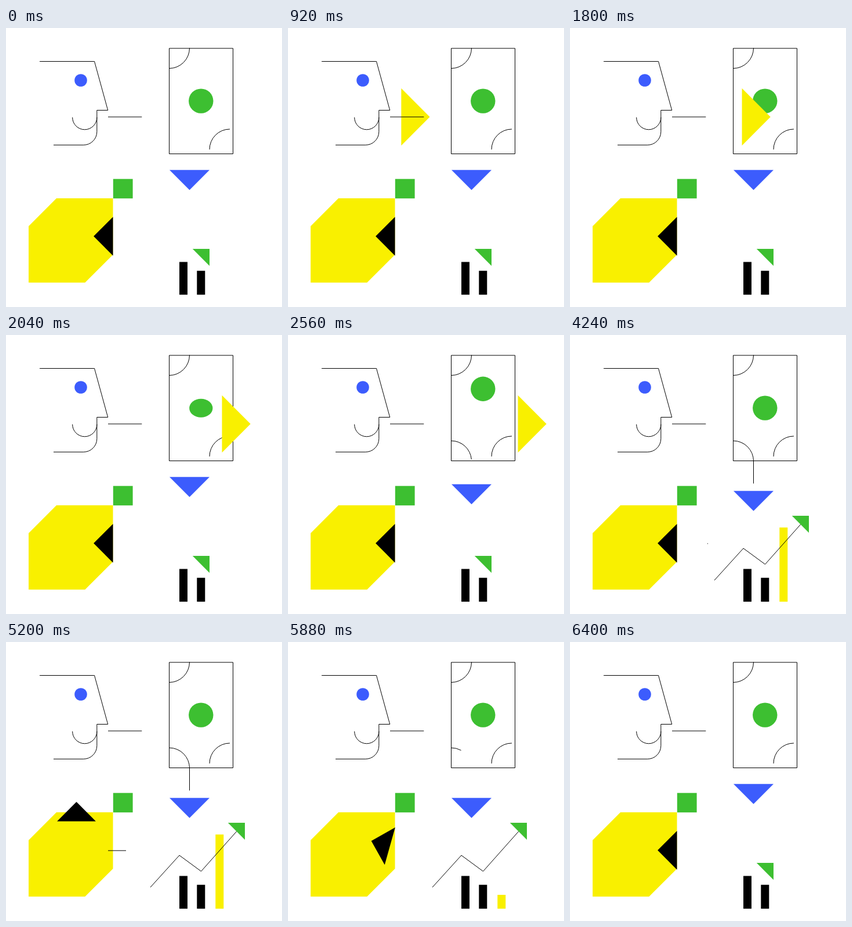
Write an HTML page with a canvas that moves like this. It is 476 px wide and 480 px high and loops after 6720 ms.

```html
<!DOCTYPE html>
<html lang="en">
<head>
<meta charset="utf-8">
<title>Shapes at work</title>
<style>
  html, body { margin: 0; width: 100%; height: 100%; overflow: hidden; background: #fff; }
  canvas { display: block; }
</style>
</head>
<body>
<canvas id="stage" width="476" height="480"></canvas>
<script>
const ctx = document.getElementById('stage').getContext('2d');
const LOOP = 6720, STEP = 40;
const YELLOW = '#f9f000', GREEN = '#3dbf31', BLUE = '#3c5cfd', BLACK = '#000';

const clamp = u => Math.min(1, Math.max(0, u));
const span = (t, from, to) => clamp((t - from) / (to - from));
const mix = (a, b, u) => a + (b - a) * u;
const outCubic = u => 1 - (1 - u) ** 3;
const inOut = u => u < 0.5 ? 4 * u ** 3 : 1 - 4 * (1 - u) ** 3;
const inOutQuad = u => u < 0.5 ? 2 * u * u : 1 - 2 * (1 - u) ** 2;
const outExpo = u => u >= 1 ? 1 : 1 - 2 ** (-10 * u);
const outBack = (u, c) => 1 + (c + 1) * (u - 1) ** 3 + c * (u - 1) ** 2;

function polygon(color, ...points) {
  ctx.fillStyle = color;
  ctx.beginPath();
  points.forEach(([x, y]) => ctx.lineTo(x, y));
  ctx.closePath();
  ctx.fill();
}

function rect(color, x, y, w, h) {
  ctx.fillStyle = color;
  ctx.fillRect(x, y, w, h);
}

function ellipse(color, x, y, rx, ry) {
  ctx.fillStyle = color;
  ctx.beginPath();
  ctx.ellipse(x, y, rx, Math.max(0, ry), 0, 0, 2 * Math.PI);
  ctx.fill();
}

// Strokes the path built by trace; a given length limits how much is drawn.
function stroke(trace, length = Infinity) {
  if (length <= 0) return;
  ctx.save();
  ctx.strokeStyle = BLACK;
  ctx.lineWidth = 1;
  if (length < Infinity) ctx.setLineDash([length, 9999]);
  ctx.beginPath();
  trace();
  ctx.stroke();
  ctx.restore();
}

function line(...points) {
  return () => points.forEach(([x, y]) => ctx.lineTo(x, y));
}

function placed(x, y, scale, angle, draw) {
  if (scale <= 0) return;
  ctx.save();
  ctx.translate(x, y);
  ctx.rotate(angle);
  ctx.scale(scale, scale);
  draw();
  ctx.restore();
}

// Coin: three falling hops with a squash at every contact.
const CONTACTS = [2030, 2400, 2740, 3038], HOPS = [47, 33, 20];

function drawCoin(t) {
  let lift = 0, squash = 0;
  CONTACTS.forEach((start, i) => {
    squash += 0.26 * Math.exp(-(((t - start) / 40) ** 2));
    if (i < HOPS.length) {
      const u = span(t, start, CONTACTS[i + 1]);
      lift += HOPS[i] * 4 * u * (1 - u);
    }
  });
  ellipse(GREEN, 336.3, 125.6 + 21 * squash - lift, 21.2 * (1 - 0.2 * squash), 21.2 * (1 - squash));
}

function drawBill(t) {
  stroke(() => ctx.rect(281.5, 35, 110, 181.5));
  stroke(() => ctx.arc(281.5, 34.5, 35, 0, Math.PI / 2));
  stroke(() => ctx.arc(386, 209, 35, Math.PI, 1.5 * Math.PI));
  drawCoin(t);

  const grown = outCubic(span(t, 2390, 3110)) - inOut(span(t, 5580, 6050));
  stroke(() => {
    ctx.arc(281.5, 217, 35, -Math.PI / 2, 0);
    ctx.lineTo(316.5, 255.5);
  }, grown * 93.5);

  const drop = 24 * (outCubic(span(t, 2400, 3130)) - inOut(span(t, 5960, 6400)));
  polygon(BLUE, [282, 244.3 + drop], [351, 244.3 + drop], [316.5, 278.8 + drop]);
}

function drawVoice(t) {
  const pop = span(t, 590, 920);
  const scale = pop > 0 ? outBack(pop, 2.3) * (1 - inOut(span(t, 2560, 2840))) : 0;
  const x = mix(219.8, 422.3, outExpo(span(t, 1680, 2880)));
  placed(x, 153, scale, 0, () => polygon(YELLOW, [-24.5, -49.3], [24.7, 0], [-24.5, 49.3]));
}

function drawFace(t) {
  stroke(() => {
    line([58, 57.5], [152.5, 57.5], [175.7, 141.5], [156.8, 141.5])();
    ctx.arcTo(156.8, 201.3, 130, 201.3, 23);
    ctx.lineTo(82, 201.3);
  });
  stroke(() => ctx.arc(135.7, 153.7, 21.1, Math.PI, 0, true));
  stroke(line([176, 153], [234.3, 153]));
  const blink = Math.sin(Math.PI * span(t, 330, 580));
  ellipse(BLUE, 129, 90, 10.8, 10.8 * (1 - 0.9 * blink));
}

function drawMouth(t) {
  polygon(YELLOW, [87, 293], [184.5, 293], [184.5, 390], [136.3, 438], [39, 438], [39, 341]);
  rect(GREEN, 184.8, 259.7, 33.8, 33.5);

  const back = inOut(span(t, 5420, 6130));
  const turn = inOutQuad(span(t, 4730, 5000)) - back;
  const go = span(t, 4870, 5200);
  const x = mix(167.8, 121.5, inOutQuad(go) - back);
  const y = mix(358.3, 291.7, outBack(go, 2.45) - back);
  placed(x, y, 1, turn * Math.PI / 2, () => polygon(BLACK, [16.7, -33.4], [16.7, 33.4], [-16.7, 0]));

  const drawn = 62 * inOutQuad(span(t, 4210, 4520));
  const right = mix(238, 176, span(t, 4960, 5440));
  const left = 238 - drawn;
  if (right > left) stroke(line([left, 358.9], [right, 358.9]));
}

const TREND = [[249, 422], [299, 367], [336.5, 394.5], [398, 325.5]];
const LENGTHS = TREND.slice(1).map(([x, y], i) => Math.hypot(x - TREND[i][0], y - TREND[i][1]));
const BEFORE_ARROW = LENGTHS[0] + LENGTHS[1];
const TOTAL = BEFORE_ARROW + LENGTHS[2];

function drawChart(t) {
  rect(BLACK, 299, 402.5, 14, 56.3);
  rect(BLACK, 329.3, 417.7, 14, 41.1);
  const bar = 127.6 * (outCubic(span(t, 3260, 3980)) - inOut(span(t, 5560, 6060)));
  if (bar > 0) rect(YELLOW, 361.3, 458.8 - bar, 14, bar);

  const length = TOTAL * (inOutQuad(span(t, 3240, 3930)) - inOut(span(t, 6020, 6400)));
  stroke(line(...TREND), length);
  const climb = clamp((length - BEFORE_ARROW) / LENGTHS[2]);
  const x = mix(351, 412, climb), y = mix(380, 311, climb);
  polygon(GREEN, [x - 29.2, y], [x, y], [x, y + 29.2]);
}

function frame() {
  const now = performance.now() % LOOP;
  const t = Math.floor(now / STEP) * STEP;
  rect('#fff', 0, 0, 476, 480);
  drawBill(t);
  drawVoice(t);
  drawFace(t);
  drawMouth(t);
  drawChart(t);
  requestAnimationFrame(frame);
}
frame();
</script>
</body>
</html>
```
